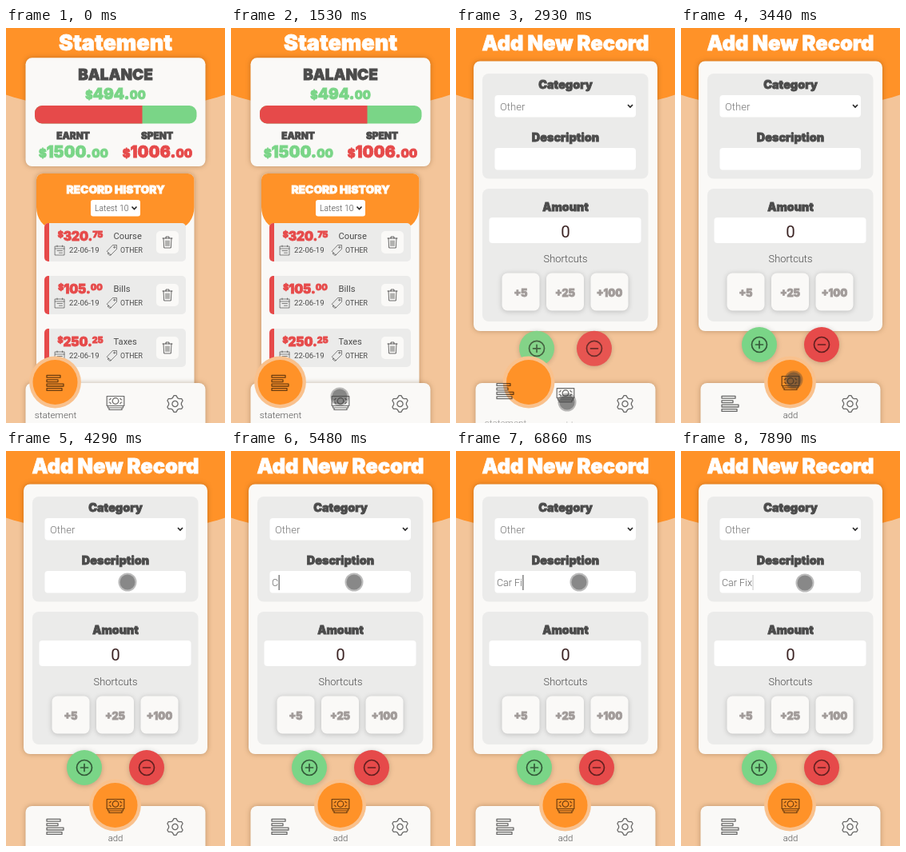
Animation of 274x494 px, one loop 8 s. Source, as an HTML page:

```html
<!DOCTYPE html>
<html lang="en">
<head>
<meta charset="utf-8">
<title>Budget app</title>
<style>
html, body { margin: 0; width: 100%; height: 100%; overflow: hidden; background: #f3c59a; }
svg { display: block; }
text { font-family: Roboto, sans-serif; fill: #4b4b4b; white-space: pre; }
.fat { font-family: Inter, sans-serif; font-weight: 900; stroke-width: .8; }
.mid { text-anchor: middle; }
.card { filter: drop-shadow(0 0 3px rgba(90, 50, 10, .35)); }
.soft { filter: drop-shadow(0 1px 3px rgba(0, 0, 0, .2)); }
.icon { fill: none; stroke: #000; stroke-opacity: .58; stroke-linejoin: round; stroke-linecap: round; }
</style>
</head>
<body>
<svg id="stage" width="274" height="494" viewBox="0 0 274 494"></svg>
<script>
const ORANGE = '#ff9228', RED = '#e64a4a', GREEN = '#7ad587', PAPER = '#faf9f7', GREY = '#ebebea', DARK = '#4b4b4b';

const rect = (x, y, w, h, r, fill, cls = '') =>
  `<rect x="${x}" y="${y}" width="${w}" height="${h}" rx="${r}" fill="${fill}" class="${cls}"/>`;
const circle = (x, y, r, fill, cls = '') =>
  `<circle cx="${x}" cy="${y}" r="${r}" fill="${fill}" class="${cls}"/>`;
const label = (s, x, y, size, color = DARK, cls = '', weight = 400) =>
  `<text x="${x}" y="${y}" font-size="${size}" class="${cls}" style="fill:${color};font-weight:${weight}">${s}</text>`;
const fat = (s, x, y, size, color = DARK) =>
  label(s, x, y, size, color, 'fat mid', 900).replace('<text', `<text stroke="${color}"`);
const icon = (x, y, d, width = 1) =>
  `<path class="icon" transform="translate(${x} ${y})" stroke-width="${width}" d="${d}"/>`;
const ring = (x, y, r) => `M${x - r} ${y}a${r} ${r} 0 1 0 ${2 * r} 0a${r} ${r} 0 1 0 ${-2 * r} 0`;
const chevron = (x, y) =>
  `<path d="M${x - 3} ${y - 1.5}l3 3 3-3" fill="none" stroke="#222" stroke-width="1.6"/>`;

// Dollar sign and cents are small; "lift" raises both.
function money(amount, x, y, size, color, lift = 0) {
  const [whole, cents] = amount.split('.'), small = size * (lift ? .68 : .74);
  return fat(`<tspan font-size="${small}" dy="${-lift}">$</tspan><tspan dy="${lift}">${whole}.</tspan>` +
    `<tspan font-size="${small}" dy="${-lift}">${cents}</tspan>`, x, y, size, color);
}

const bars = [17, 14, 21, 19].map((w, i) => `M-10 ${i * 5.4 - 9.6}h${w}v2.8h${-w}z`).join('');
const bill = 'M-10.8-8.5h21.6v12h-21.6z' + ring(0, -2.5, 3.8) +
  'M-8-4a2 2 0 0 0 2-2M8-4a2 2 0 0 1-2-2M-8-1a2 2 0 0 1 2 2M8-1a2 2 0 0 0-2 2M-9.5 3.5v2.5h19v-2.5M-8 6v2.5h16v-2.5';
const gear = 'M' + Array.from({ length: 24 }, (_, i) => {
  const a = (i + 1.5) * Math.PI / 12, r = i % 4 < 2 ? 10.4 : 8;
  return `${(r * Math.cos(a)).toFixed(1)} ${(r * Math.sin(a)).toFixed(1)}`;
}).join('L') + 'z' + ring(0, 0, 3.6);
const trash = 'M-6-5h12M-2-5v-2h4v2M-5-5l.7 12h8.6l.7-12M-2-2v6.5M0-2v6.5M2-2v6.5';
const calendar = 'M-6-5h11.5v11h-11.5zM-6-2h11.5M-3.5-6v1.5M3-6v1.5M-3.5.5h6.5M-1 3.2h4';
const tag = 'M-6 1.5L1-6h5v5L-1 6zM-4 4l-1.5.5 3 2.5L-1 6' + ring(3.3, -3.3, 1);

const record = (amount, name, y) =>
  rect(48, y, 177, 48, 5, GREY) +
  `<path d="M54 ${y}h-1a5 5 0 0 0-5 5v38a5 5 0 0 0 5 5h1z" fill="${RED}"/>` +
  money(amount, 93, y + 22, 15.5, RED, 4) + label(name, 134.5, y + 20, 11.2) +
  icon(67.5, y + 34, calendar, .8) + label('22-06-19', 79, y + 37, 9.6) +
  icon(132.5, y + 33.5, tag, .8) + label('OTHER', 143, y + 37, 8.8) +
  rect(188, y + 10, 28, 28, 5, PAPER) + icon(202, y + 24, trash);

const statement =
  fat('Statement', 137, 28, 27, '#fff') +
  rect(24.5, 37.3, 225, 135.7, 8, PAPER, 'card') +
  fat('BALANCE', 137, 65, 18.9) + money('494.00', 137, 89, 19, GREEN) +
  rect(36, 97, 202.5, 22.5, 9, GREEN) +
  `<path d="M170.5 97H45a9 9 0 0 0-9 9v4.5a9 9 0 0 0 9 9H170.5z" fill="${RED}"/>` +
  fat('EARNT', 84, 139, 11.8) + fat('SPENT', 189, 139, 11.8) +
  money('1500.00', 84.5, 161.5, 19.7, GREEN) + money('1006.00', 189.5, 161.5, 19.7, RED) +
  rect(38, 182, 197.5, 320, 8, PAPER, 'card') +
  `<path d="M38 224V190a8 8 0 0 1 8-8H227.5a8 8 0 0 1 8 8V224a20 26 0 0 1-20 26H58a20 26 0 0 1-20-26z" fill="${ORANGE}"/>` +
  fat('RECORD HISTORY', 137, 207, 13.8, '#fff') +
  rect(106, 215, 62, 20.5, 3, '#fff') + label('Latest 10', 111, 229, 10.4, DARK, '', 300) + chevron(160.5, 225) +
  record('320.75', 'Course', 244) + record('105.00', 'Bills', 310) + record('250.25', 'Taxes', 376);

const shortcut = (s, x) => rect(x, 306.5, 47, 47, 7, PAPER, 'soft') + fat(s, x + 23.5, 335.5, 12.7, '#a19b99');
const sign = (id, color, d) =>
  `<g id="${id}">${circle(0, 0, 22, color, 'soft')}${icon(0, 0, ring(0, 0, 9.5) + d, 1.7)}</g>`;

const form =
  fat('Add New Record', 137, 28, 25.4, '#fff') +
  rect(22, 41.5, 230, 337.5, 8, PAPER, 'card') +
  rect(33, 57, 207.5, 131.5, 8, GREY) + fat('Category', 137, 76, 14.4) +
  rect(48.5, 84, 176.5, 27.5, 4, '#fff') + label('Other', 55, 102.5, 13.1, '#777', '', 300) + chevron(218, 97.5) +
  fat('Description', 137, 142, 14.4) + rect(48.5, 150, 176.5, 27.5, 4, '#fff') +
  label('', 51, 169, 12.5, '#666', '', 300).replace('<text', '<text id="typed"') +
  rect(0, 155, 1, 19, 0, '#444').replace('<rect', '<rect id="caret"') +
  rect(33, 201, 207.5, 166, 8, GREY) + fat('Amount', 137, 229, 14.2) +
  rect(41.5, 237, 190, 32, 4, '#fff') + label('0', 137, 261.5, 20.5, '#3c2424', 'mid') +
  label('Shortcuts', 137, 293, 12.8, DARK, 'mid', 300) +
  shortcut('+5', 57.5) + shortcut('+25', 113) + shortcut('+100', 168.5) +
  sign('plus', GREEN, 'M-4.5 0h9M0-4.5v9') + sign('minus', RED, 'M-4.5 0h9');

const $ = id => document.getElementById(id);
$('stage').innerHTML =
  `<rect width="274" height="494" fill="#f3c59a"/><ellipse cx="137" rx="230" ry="104" fill="${ORANGE}"/>` +
  `<g id="statement">${statement}</g><g id="form">${form}</g>` +
  rect(24.5, 444, 225, 70, 8, PAPER, 'card') +
  `<g id="knob">${circle(0, 0, 32.4, '#f9c18d')}${circle(0, 0, 28, ORANGE)}</g>` +
  `<g id="list">${icon(0, 0, bars, 1.3)}</g><g id="cash">${icon(0, 0, bill, 1.2)}</g>${icon(211.5, 470, gear, 1.3)}` +
  `<g id="listName">${label('statement', 0, 0, 11.7, '#555', 'mid', 300)}</g>` +
  `<g id="cashName">${label('add', 0, 0, 11.4, '#555', 'mid', 300)}</g>` +
  `<g id="pointer">${circle(0, 0, 11.5, 'rgba(60,60,60,.35)')}${circle(0, 0, 9.5, 'rgba(60,60,60,.4)')}</g>`;

const ticks = [0, 1200, 1370, 1530, 1710, 1890, 2060, 2240, 2560, 2740, 2930, 3090, 3250, 3420, 3590,
  3770, 3930, 4110, 4290, 4470, 4620, 5480, 5650, 5820, 6180, 6350, 6520, 6690, 6860, 7210, 7730, 7890];
const path = [[1200, 33, 462], [1370, 95, 461], [1530, 136, 461], [1710, 150, 466], [1890, 146, 468],
  [2240, 139, 468], [3250, 139, 468], [3420, 141, 440], [3590, 143, 384], [3770, 146, 320], [3930, 149, 240],
  [4110, 151, 182], [4290, 152, 164], [4620, 154, 164], [7210, 154, 164], [7730, 155, 165], [8000, 155, 165]];
const keys = [5480, 5650, 6180, 6350, 6520, 6860, 7210];

const clamp = v => Math.min(1, Math.max(0, v));
const mix = (a, b, p) => a + (b - a) * p;
const place = (id, x, y, opacity = 1) => {
  $(id).setAttribute('transform', `translate(${x} ${y})`);
  $(id).setAttribute('opacity', opacity);
};

function pointerAt(t) {
  const i = Math.max(1, path.findIndex(k => k[0] > t));
  const [a, b] = [path[i - 1], path[i]], p = clamp((t - a[0]) / (b[0] - a[0]));
  return [mix(a[1], b[1], p), mix(a[2], b[2], p)];
}

function draw(now) {
  const time = now % 8000, t = ticks.findLast(k => k <= time);
  const u = clamp((t - 2780) / 350), p = u * u * (3 - 2 * u), q = 1 - p;
  const onForm = t >= 2930;
  $('statement').style.display = onForm ? 'none' : '';
  $('form').style.display = onForm ? '' : 'none';

  place('knob', mix(61.5, 136.5, p), 443);
  place('list', 61, mix(444, 470, p));
  place('cash', 137, mix(469, 444, p));
  place('listName', 62, 488 + 25 * p, q);
  place('cashName', 137, 488 + 20 * q, p);
  place('plus', 98 + 5 * q, 396 + 8 * q, 1 - .15 * q);
  place('minus', 176 - 5 * q, 396 + 8 * q, 1 - .15 * q);
  place('pointer', ...pointerAt(t), t >= 1200 ? 1 : 0);

  if (onForm) {
    $('typed').textContent = 'Car Fix'.slice(0, keys.filter(k => k <= t).length);
    $('caret').setAttribute('x', 51.5 + $('typed').getComputedTextLength());
    $('caret').setAttribute('opacity', t < 4470 || t === 5820 || t === 7730 ? 0 : t === 7890 ? .3 : 1);
  }
}

const start = performance.now();
(function loop() {
  draw(performance.now() - start);
  requestAnimationFrame(loop);
})();
</script>
</body>
</html>
```
